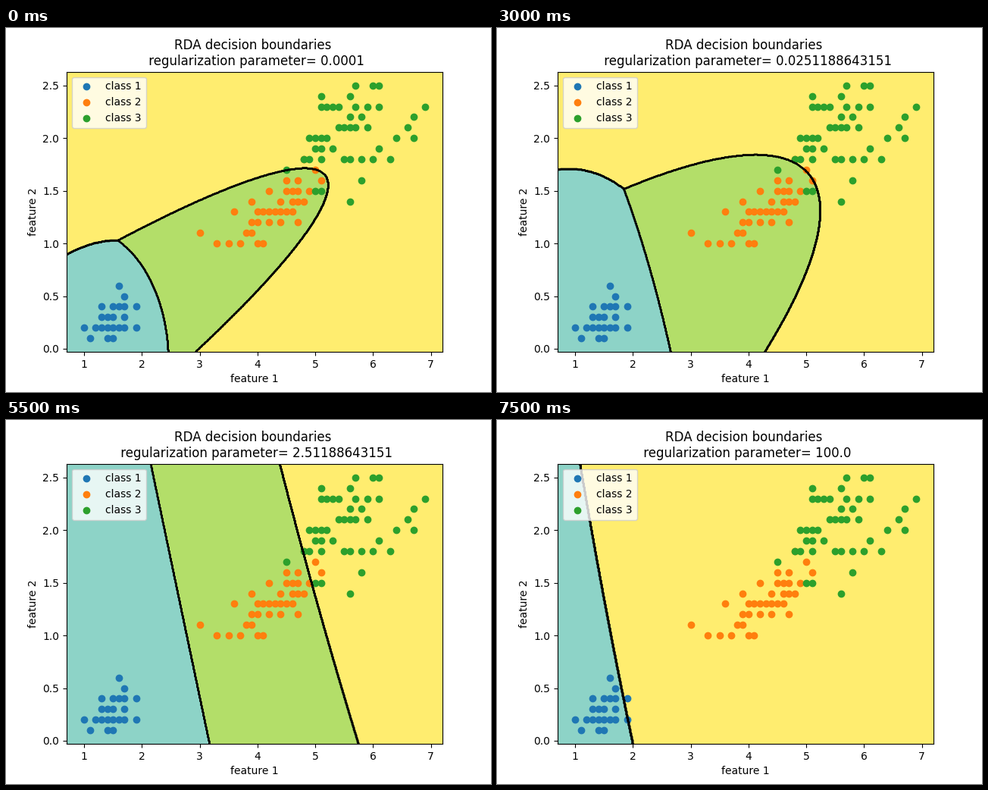
A matplotlib script that plays this animation: 640x480 px, repeating every 8000 ms.

```python
import numpy as np
import matplotlib.pyplot as plt
from matplotlib.animation import FuncAnimation

FRAMES = 16
STRENGTHS = np.logspace(-4, 2, FRAMES)
X_LIM, Y_LIM = (0.6975, 7.2025), (-0.0305, 2.6305)

# Distinct points of each class in tenths: {feature 2: [feature 1, ...]}
POINTS_1 = {
    1: [11, 14, 15], 2: [10, 12, 13, 14, 15, 16, 17, 19],
    3: [13, 14, 15, 17], 4: [13, 15, 16, 17, 19], 5: [17], 6: [16],
}
POINTS_2 = {
    10: [33, 35, 37, 40, 41], 11: [30, 38, 39], 12: [39, 40, 42, 44, 47],
    13: [36, *range(40, 47)], 14: [39, 44, 46, 47, 48],
    15: [42, 45, 46, 47, 49], 16: [45, 47, 51], 17: [50], 18: [48],
}
POINTS_3 = {
    14: [56], 15: [50, 51], 16: [58], 17: [45],
    18: [48, 49, 51, 55, 56, 58, 60, 63], 19: [50, 51, 53, 61],
    20: [49, 50, 51, 52, 64, 67], 21: [54, 55, 56, 57, 59, 66],
    22: [56, 58, 67], 23: [51, 52, 53, 54, 57, 59, 61, 69],
    24: [51, 56], 25: [57, 60, 61],
}

# Mean and (var x, cov, var y) of each class, repeated samples included
GAUSSIANS = [
    ((1.462, 0.246), (0.030159, 0.006069, 0.011106)),
    ((4.260, 1.326), (0.220816, 0.073102, 0.039106)),
    ((5.552, 2.026), (0.304588, 0.048824, 0.075433)),
]

grid_x, grid_y = np.meshgrid(np.linspace(*X_LIM, 500), np.linspace(*Y_LIM, 500))


def cost(mean, cov, strength):
    """Negative log likelihood (doubled) under a covariance shrunk to identity."""
    vx, vxy, vy = (1 - strength) * np.array(cov) + strength * np.array([1, 0, 1])
    dx, dy = grid_x - mean[0], grid_y - mean[1]
    det = vx * vy - vxy ** 2
    return (vy * dx ** 2 - 2 * vxy * dx * dy + vx * dy ** 2) / det + np.log(det)


def classify(strength):
    return np.argmin([cost(m, c, strength) for m, c in GAUSSIANS], axis=0)


def number_text(value):
    text = f"{value:.12g}"
    return text if "." in text else text + ".0"


fig, ax = plt.subplots(figsize=(6.4, 4.8), dpi=100)
mesh = ax.pcolormesh(grid_x, grid_y, np.zeros(grid_x.shape), cmap="Set3",
                     shading="nearest", zorder=0)
for index, rows in enumerate((POINTS_1, POINTS_2, POINTS_3), start=1):
    xy = np.array([(x, y) for y, xs in rows.items() for x in xs]) / 10
    ax.scatter(xy[:, 0], xy[:, 1], label=f"class {index}", zorder=1)
ax.set(xlim=X_LIM, ylim=Y_LIM, xlabel="feature 1", ylabel="feature 2")
ax.legend(loc="upper left")
boundaries = None


def update(frame):
    global boundaries
    strength = STRENGTHS[frame]
    labels = classify(strength)
    low, high = labels.min(), labels.max()
    mesh.set_array(labels.astype(float))
    mesh.set_clim(low, high)
    if boundaries is not None:
        boundaries.remove()
    boundaries = ax.contour(grid_x, grid_y, labels, colors="black",
                            levels=np.linspace(low, high, 9)[1:-1], zorder=2)
    ax.set_title("RDA decision boundaries \n regularization parameter= "
                 + number_text(strength))


anim = FuncAnimation(fig, update, frames=FRAMES, interval=500, repeat=True,
                     repeat_delay=0)
plt.show()
```
